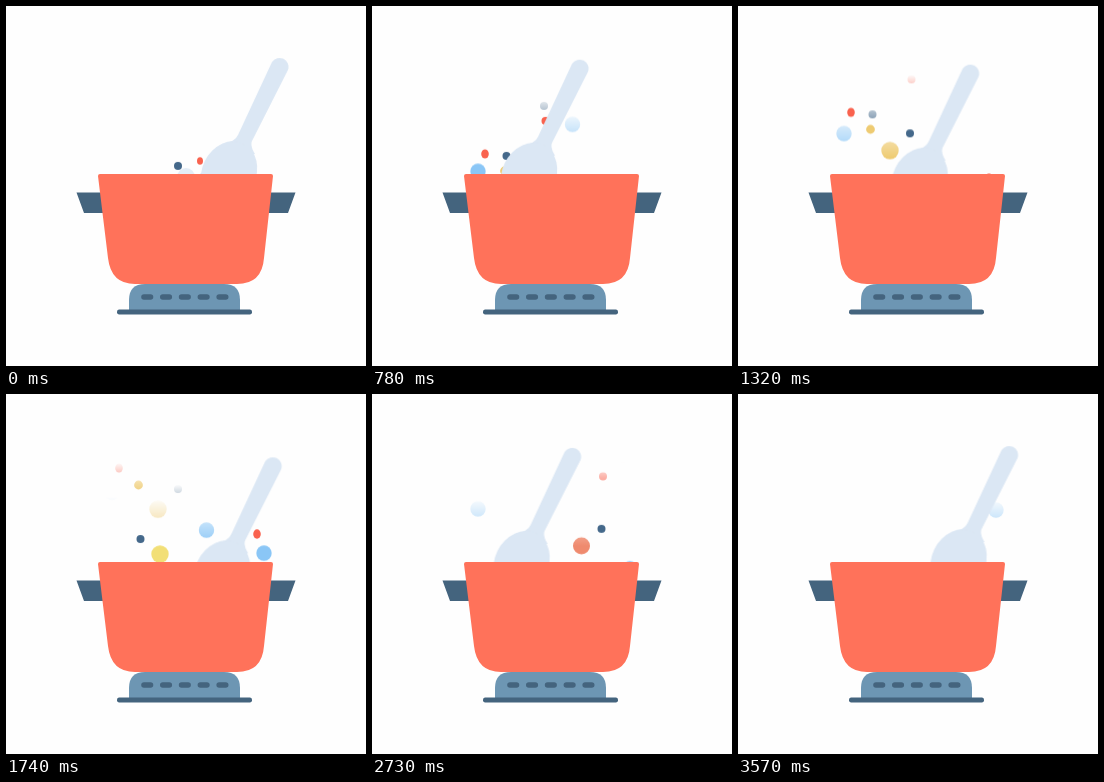
Write an HTML page without scripts that moves like this. It is 360x360 px and loops after 3600 ms.

```html
<!DOCTYPE html>
<html lang="en">
<head>
<meta charset="utf-8">
<title>Cooking pot</title>
<style>
  html, body { margin: 0; width: 100%; height: 100%; overflow: hidden; background: #fefefe; }
  svg { display: block; width: 100vw; height: 100vh; }

  .spoon { fill: #dbe7f4; animation: stir 3600ms linear infinite; }
  @keyframes stir {
    0%, 100% { transform: translate(0, 0); }
    25%, 75% { transform: translate(-76px, 2px); }
    50% { transform: translate(-2px, 12px); }
  }

  /* Bubbles climb for the whole loop; each group's mask decides where they show. */
  .small { --climb: -277px; }
  .large { --climb: -252px; }
  .small > *, .large > * { animation: rise 3600ms linear infinite; }
  @keyframes rise {
    from { transform: translateY(0); }
    to { transform: translateY(var(--climb)); }
  }

  .red { fill: #f9624e; }
  .navy { fill: #44688a; }
  .gold { fill: #eecb72; }
  .yellow { fill: #f2df76; }
  .orange { fill: #ef8a6e; }
  .blue { fill: #8ac6f6; }
  .pale { fill: #e4edf6; }
  .steel { fill: #44647e; }
</style>
</head>
<body>
<svg viewBox="0 0 360 360" xmlns="http://www.w3.org/2000/svg">
  <defs>
    <linearGradient id="fadeHigh" gradientUnits="userSpaceOnUse" x1="0" y1="100" x2="0" y2="68">
      <stop stop-color="#fff"/><stop offset="1" stop-color="#000"/>
    </linearGradient>
    <linearGradient id="fadeMid" gradientUnits="userSpaceOnUse" x1="0" y1="126" x2="0" y2="90">
      <stop stop-color="#fff"/><stop offset="1" stop-color="#000"/>
    </linearGradient>
    <linearGradient id="fadeLow" gradientUnits="userSpaceOnUse" x1="0" y1="152" x2="0" y2="103">
      <stop stop-color="#fff"/><stop offset="1" stop-color="#000"/>
    </linearGradient>
    <mask id="high" maskUnits="userSpaceOnUse" x="0" y="0" width="360" height="180">
      <rect width="360" height="180" fill="url(#fadeHigh)"/>
    </mask>
    <mask id="mid" maskUnits="userSpaceOnUse" x="0" y="0" width="360" height="180">
      <rect width="360" height="180" fill="url(#fadeMid)"/>
    </mask>
    <mask id="low" maskUnits="userSpaceOnUse" x="0" y="0" width="360" height="180">
      <rect width="360" height="180" fill="url(#fadeLow)"/>
    </mask>
  </defs>

  <g class="large" mask="url(#low)">
    <circle class="pale" cx="180" cy="171" r="9"/>
    <circle class="gold" cx="152" cy="237" r="8.7"/>
    <circle class="yellow" cx="154" cy="282" r="8.7"/>
    <circle class="orange" cx="209.5" cy="343" r="8.5"/>
    <circle class="blue" cx="106" cy="220" r="7.7"/>
    <circle class="blue" cx="106" cy="306" r="7.7"/>
    <circle class="blue" cx="200.5" cy="173" r="7.7"/>
    <circle class="blue" cx="200.5" cy="258" r="7.7"/>
    <circle class="blue" cx="258" cy="281" r="7.7"/>
    <circle class="blue" cx="258" cy="366" r="7.7"/>
  </g>
  <g class="small navy" mask="url(#mid)">
    <circle cx="134.500" cy="210" r="4"/>
    <circle cx="134.500" cy="279" r="4"/>
    <circle cx="172" cy="160" r="4"/>
    <circle cx="172" cy="229" r="4"/>
    <circle cx="229.500" cy="277" r="4"/>
    <circle cx="229.500" cy="345" r="4"/>
  </g>
  <g class="small red" mask="url(#high)">
    <ellipse cx="113" cy="208" rx="3.800" ry="4.500"/>
    <ellipse cx="194" cy="155" rx="3" ry="3.800"/>
    <ellipse cx="251" cy="274" rx="3.800" ry="4.700"/>
    <circle cx="173.500" cy="175" r="4"/>
    <circle cx="231" cy="292.500" r="4"/>
    <circle class="gold" cx="132.500" cy="225" r="4.400"/>
  </g>

  <g class="spoon">
    <path d="M266 56A9 9 0 0 1 282 64L246 135Q244 140 249 148L222 150 216 138Q229 136 232 129Z"/>
    <ellipse cx="223" cy="167" rx="27" ry="33" transform="rotate(26 223 167)"/>
  </g>

  <path fill="#6d96b3" d="M123 305V294Q123 278 139 278H218Q234 278 234 294V305Z"/>
  <path stroke="#44647e" stroke-width="5.600" stroke-linecap="round"
        d="M138 291h6.500m12.300 0h6.500m12.300 0h6.500m12.300 0h6.500m12.300 0h6.500"/>
  <rect class="steel" x="111" y="303.500" width="135" height="5" rx="2.200"/>

  <path class="steel" d="M70.500 186.500H100V207H78ZM289.500 186.500H260V207H282Z"/>
  <path fill="#ff725a" d="M92 170Q92 168 94 168H265Q267 168 267 170L258 252Q256 278 231 278H129Q105 278 102 252Z"/>
</svg>
</body>
</html>
```
